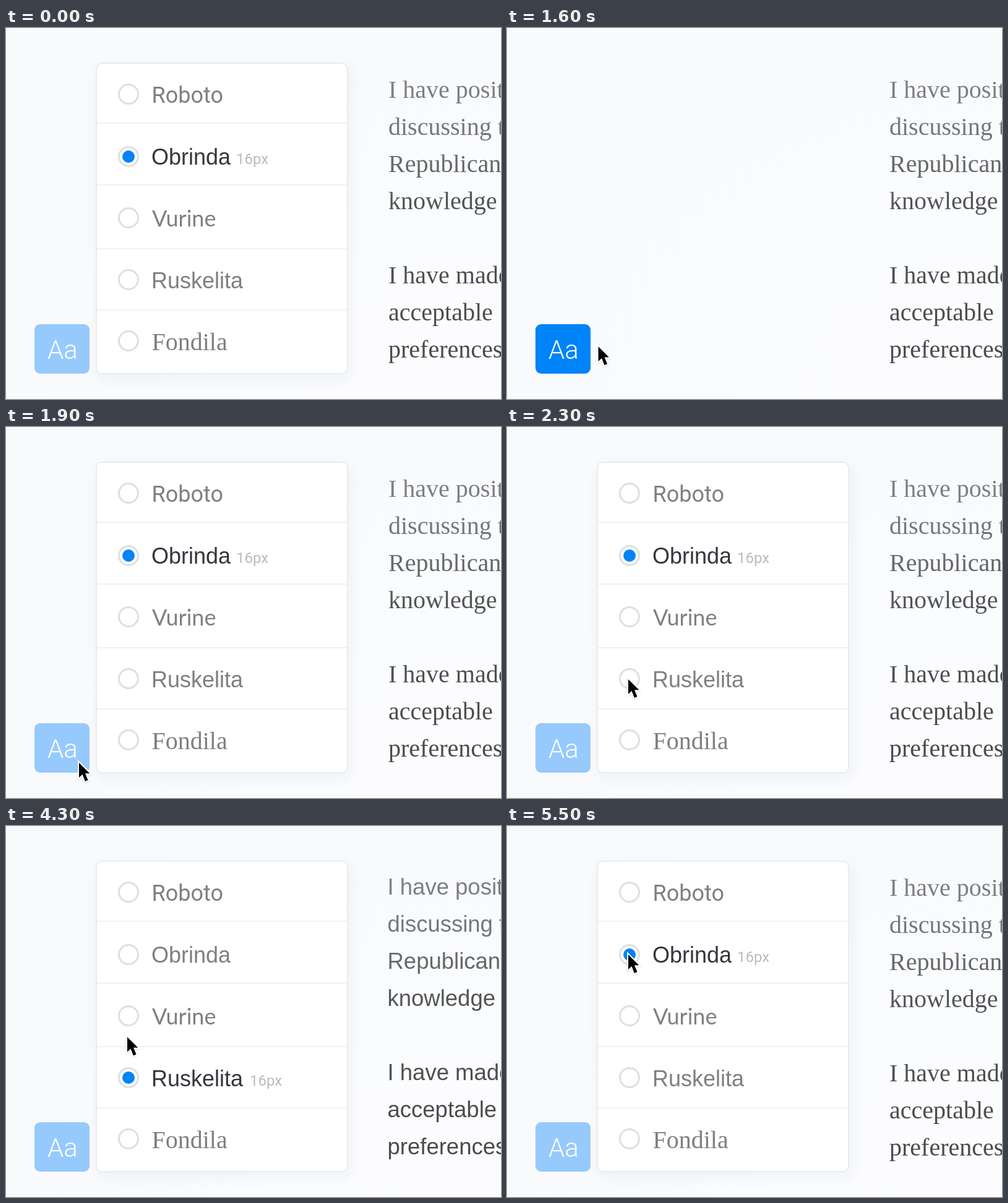
Animation, 800 px wide and 600 px high, one loop 6500 ms. Source, as an HTML page:

```html
<!DOCTYPE html>
<html lang="en">
<head>
<meta charset="utf-8">
<title>Typeface picker</title>
<style>
  html, body { margin: 0; width: 100%; height: 100%; overflow: hidden; background: #f9fafc; }
  svg { display: block; width: 800px; height: 600px; }
  .sans { font-family: "Liberation Sans", Arial, sans-serif; }
  .serif { font-family: "Liberation Serif", "Times New Roman", serif; }
  .roboto { font-family: Roboto, sans-serif; }
  .lato { font-family: Lato, sans-serif; }
  .body { fill: url(#ink); }
  .body.serif { font-size: 40px; }
  .body.sans { font-size: 36.5px; }
  .name { fill: #7e7f83; }
  .on .name { fill: #33363c; }
  .size { font-size: 24px; fill: #babbbe; }
  .dot { fill: #0084f8; }
  .dot, .size { visibility: hidden; }
  .on .dot, .on .size { visibility: visible; }
  .ring { fill: #fff; stroke: #dedfe0; stroke-width: 3; }
</style>
</head>
<body>
<svg id="stage" viewBox="0 0 800 600" xmlns="http://www.w3.org/2000/svg">
  <defs>
    <radialGradient id="paper" cx="1" cy="1" r="1.2">
      <stop offset="0" stop-color="#fcfcfe"/>
      <stop offset=".4" stop-color="#fbfcfe"/>
      <stop offset=".8" stop-color="#f9fafc"/>
      <stop offset="1" stop-color="#f8fafc"/>
    </radialGradient>
    <linearGradient id="ink" gradientUnits="userSpaceOnUse" x1="680" y1="80" x2="720" y2="540">
      <stop offset="0" stop-color="#808184"/>
      <stop offset=".2" stop-color="#757679"/>
      <stop offset=".31" stop-color="#666769"/>
      <stop offset=".44" stop-color="#525355"/>
      <stop offset="1" stop-color="#48494b"/>
    </linearGradient>
    <filter id="soft" x="-20%" y="-20%" width="140%" height="140%">
      <feDropShadow dx="4" dy="8" stdDeviation="11" flood-color="#28405a" flood-opacity=".05"/>
    </filter>
    <filter id="lift" x="-50%" y="-50%" width="200%" height="200%">
      <feDropShadow dx="0" dy="1" stdDeviation="1" flood-opacity=".15"/>
    </filter>
  </defs>
  <rect width="800" height="600" fill="url(#paper)"/>
  <g id="copy"></g>
  <rect id="button" x="46" y="479" width="89" height="80" rx="9"/>
  <text class="roboto" x="67" y="534.5" font-size="42" font-weight="300" fill="#fff">Aa</text>
  <g id="menu">
    <rect x="146" y="57" width="406" height="502" rx="9" fill="#fff" stroke="#e9ecef" stroke-width="2" filter="url(#soft)"/>
    <path d="M147 154H551M147 254H551M147 357H551M147 456H551" stroke="#f0f1f2" stroke-width="2"/>
  </g>
  <path id="cursor" d="M0 0V24L5.5 18.8L9.8 30L14.5 28L10 17.2H17.3Z"
    fill="#000" stroke="#fff" stroke-width="4" paint-order="stroke" filter="url(#lift)"/>
</svg>
<script>
const LOOP = 6500, STEP = 100;
const OPEN = 1900, PICK_SANS = 3300, PICK_SERIF = 5500;

const lines = ["I have positions", "discussing the", "Republican", "knowledge", "",
  "I have made", "acceptable", "preferences"];

// label, class, font size, text x, ring y, size label x
const rows = [
  ["Roboto", "roboto", 36, 235.5, 107],
  ["Obrinda", "sans", 36, 235, 208, 372],
  ["Vurine", "lato", 36, 236, 307],
  ["Ruskelita", "sans", 36, 235, 407, 394],
  ["Fondila", "serif", 40, 235.5, 506]
];

// time, x, y
const path = [
  [1000, 325, 349], [1700, 118, 543], [1900, 118, 543],
  [2300, 196, 408], [4200, 196, 408], [4500, 196, 208]
];

const get = id => document.getElementById(id);

function add(parent, tag, attrs, text = "") {
  const el = document.createElementNS("http://www.w3.org/2000/svg", tag);
  for (const key in attrs) el.setAttribute(key, attrs[key]);
  el.textContent = text;
  return parent.appendChild(el);
}

function makeCopy(cls, x, top) {
  const g = add(get("copy"), "g", { class: "body " + cls });
  lines.forEach((line, i) => add(g, "text", { x, y: top + i * 60 }, line));
  return g;
}

function makeRow([label, cls, size, x, y, sizeX], i) {
  const g = add(get("menu"), "g", {});
  const base = 120.5 + i * 100;
  add(g, "circle", { class: "ring", cx: 198, cy: y, r: 15.5 });
  add(g, "circle", { class: "dot", cx: 198, cy: y, r: 10 });
  add(g, "text", { class: "name " + cls, x, y: base, "font-size": size }, label);
  if (sizeX) add(g, "text", { class: "size roboto", x: sizeX, y: base - .5 }, "16px");
  return g;
}

const serifCopy = makeCopy("serif", 618, 113);
const sansCopy = makeCopy("sans", 616.5, 111);
const rowEls = rows.map(makeRow);

function cursorAt(t) {
  const next = path.findIndex(p => p[0] > t);
  if (next < 0) return path[path.length - 1].slice(1);
  const [t0, x0, y0] = path[next - 1], [t1, x1, y1] = path[next];
  const k = (t - t0) / (t1 - t0);
  return [x0 + (x1 - x0) * k, y0 + (y1 - y0) * k];
}

function show(el, visible) {
  el.style.display = visible ? "" : "none";
}

function draw(time) {
  const t = Math.floor((time % LOOP) / STEP) * STEP;
  const open = t < 1000 || t >= OPEN;
  const sans = t >= PICK_SANS && t < PICK_SERIF;

  show(get("menu"), open);
  get("button").setAttribute("fill", open ? "#96cafd" : "#0084f9");
  show(sansCopy, sans);
  show(serifCopy, !sans);
  rowEls.forEach((el, i) => el.classList.toggle("on", i === (sans ? 3 : 1)));

  show(get("cursor"), t >= 1000);
  if (t >= 1000) get("cursor").setAttribute("transform", `translate(${cursorAt(t)})`);
}

const start = performance.now();
function tick() {
  draw(performance.now() - start);
  requestAnimationFrame(tick);
}
tick();
</script>
</body>
</html>
```
